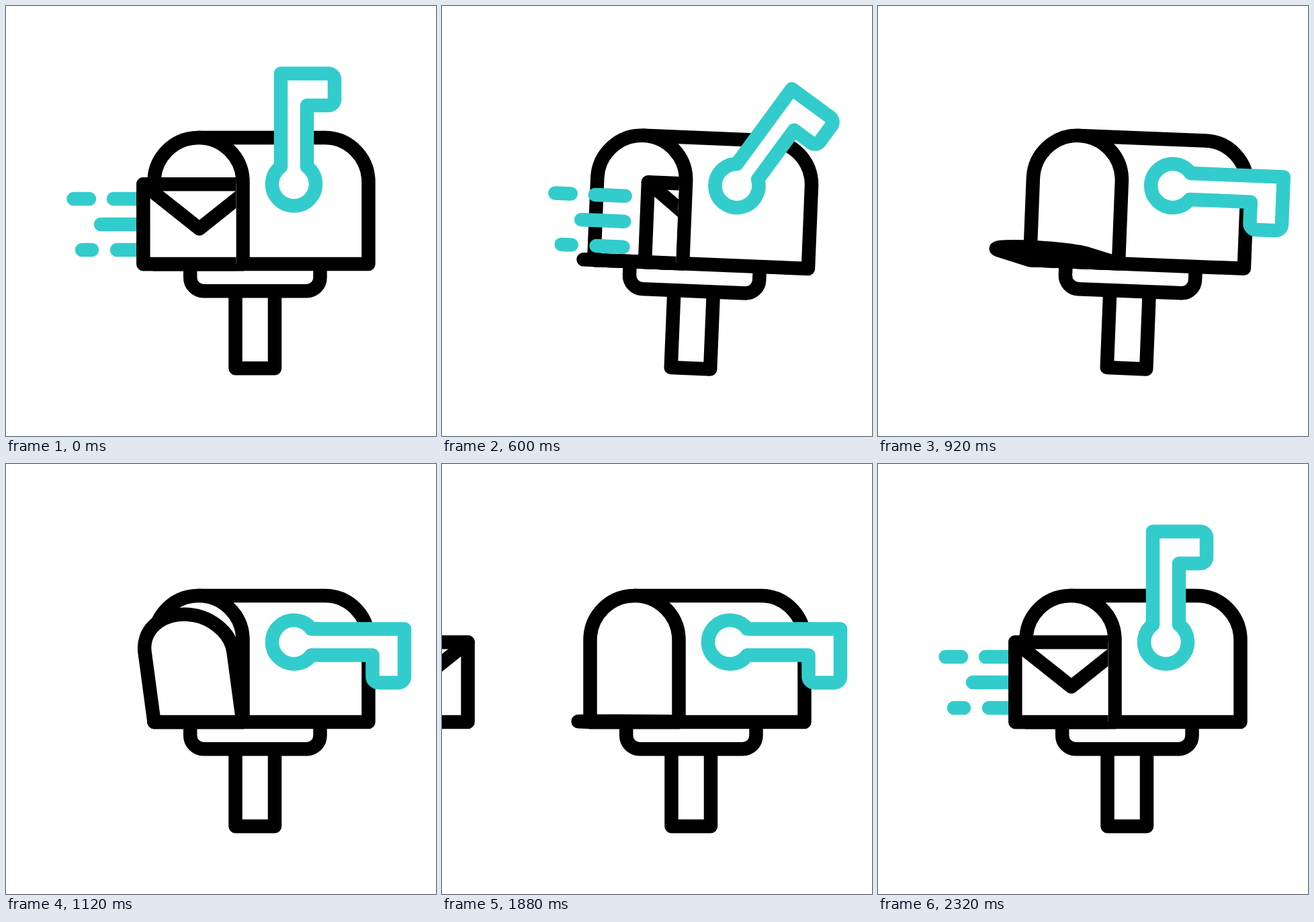
An HTML page that plays this animation: 640 px wide and 640 px high, repeating every 2400 ms.

```html
<!DOCTYPE html>
<html lang="en">
<head>
<meta charset="utf-8">
<title>Mailbox</title>
<style>
html, body { margin: 0; width: 100%; height: 100%; overflow: hidden; background: #fff; }
svg { display: block; width: 100vw; height: 100vh; }
path { stroke-width: 20.5; stroke-linecap: round; stroke-linejoin: round; }
.ink { stroke: #000; }
.teal { stroke: #33cccc; }
</style>
</head>
<body>
<svg viewBox="0 0 640 640" fill="#fff">
  <clipPath id="slot"><rect x="-900" y="0" width="1242.5" height="640"/></clipPath>
  <g id="box">
    <path class="ink" d="M341.5 424V539.3H400V424"/>
    <path class="ink" d="M274.2 384V404A20 20 0 0 0 294.2 424.2H447.5A20 20 0 0 0 467.5 404V384"/>
    <path class="ink" d="M286.5 196H474.5A65 66 0 0 1 539.5 262V384H220.5"/>
    <path class="ink" d="M220.5 384V262A66 66 0 0 1 352.5 262V384Z"/>
    <path class="ink" id="door"/>
    <g clip-path="url(#slot)">
      <path class="teal" id="lines" fill="none" d="M100.5 287H124M160 287H205M141 325H205M113 363H128M165 363H205"/>
      <g id="letter">
        <path class="ink" d="M204.3 265.2H371V384H204.3Z"/>
        <path class="ink" fill="none" d="M204.3 265.2L287.8 331.5L371 265.2"/>
      </g>
    </g>
    <path class="teal" id="flag" d="M409 239V100.5H480A9 9 0 0 1 489 109.5V139A9 9 0 0 1 480 148H448V239A32.5 32.5 0 1 1 409 239Z"/>
  </g>
</svg>
<script>
const LOOP = 2400, RETURN = 1740;
const el = id => document.getElementById(id);
const box = el('box'), door = el('door'), lines = el('lines'), letter = el('letter'), flag = el('flag');

// Smooth 0 to 1 between two times
function ease(t, from, to) {
  const u = Math.min(1, Math.max(0, (t - from) / (to - from)));
  return u * u * (3 - 2 * u);
}

const tilt = t => 6.4 * (ease(t, 490, 760) - ease(t, 760, 1030));
const flagTurn = t => 90 * (ease(t, 487, 760) - ease(t, 1934, 2207));

// Both draw back, shoot into the box, then arrive again from the left
const letterX = t => t < RETURN
  ? 406 * ease(t, 320, 960) - 74 * ease(t, 0, 320)
  : 395 * (ease(t, RETURN, 2300) - 1);
const linesX = t => t < RETURN
  ? 385 * ease(t, 355, 957) - 82.3 * ease(t, 10, 340)
  : 400 * (ease(t, RETURN + 10, 2320) - 1);

// Door height: 0 lies open, 1 is shut
const doorRise = t =>
  .2 * (ease(t, 865, 975) - ease(t, 1720, 1900)) +
  .8 * (ease(t, 965, 1180) - ease(t, 1500, 1720));

// The arched door, leaned left and flattened towards its hinge
function doorPath(rise) {
  const lean = Math.min(.125 + 2.475 * rise, .775 * (1 - rise));
  const p = (x, h) => (286.5 + x - lean * h).toFixed(2) + ' ' + (384 - rise * h).toFixed(2);
  const r = 66, c = r * .5523, h = 122;
  return `M${p(-r, 0)}L${p(-r, h)}` +
    `C${p(-r, h + c)} ${p(-c, h + r)} ${p(0, h + r)}` +
    `C${p(c, h + r)} ${p(r, h + c)} ${p(r, h)}L${p(r, 0)}Z`;
}

function draw(t) {
  box.setAttribute('transform', `rotate(${tilt(t)} 371 520)`);
  flag.setAttribute('transform', `rotate(${flagTurn(t)} 428.5 265)`);
  letter.setAttribute('transform', `translate(${letterX(t)} 0)`);
  lines.setAttribute('transform', `translate(${linesX(t)} 0)`);
  door.setAttribute('d', doorPath(doorRise(t)));
}

const start = performance.now();
function tick() {
  draw((performance.now() - start) % LOOP);
  requestAnimationFrame(tick);
}
tick();
</script>
</body>
</html>
```
